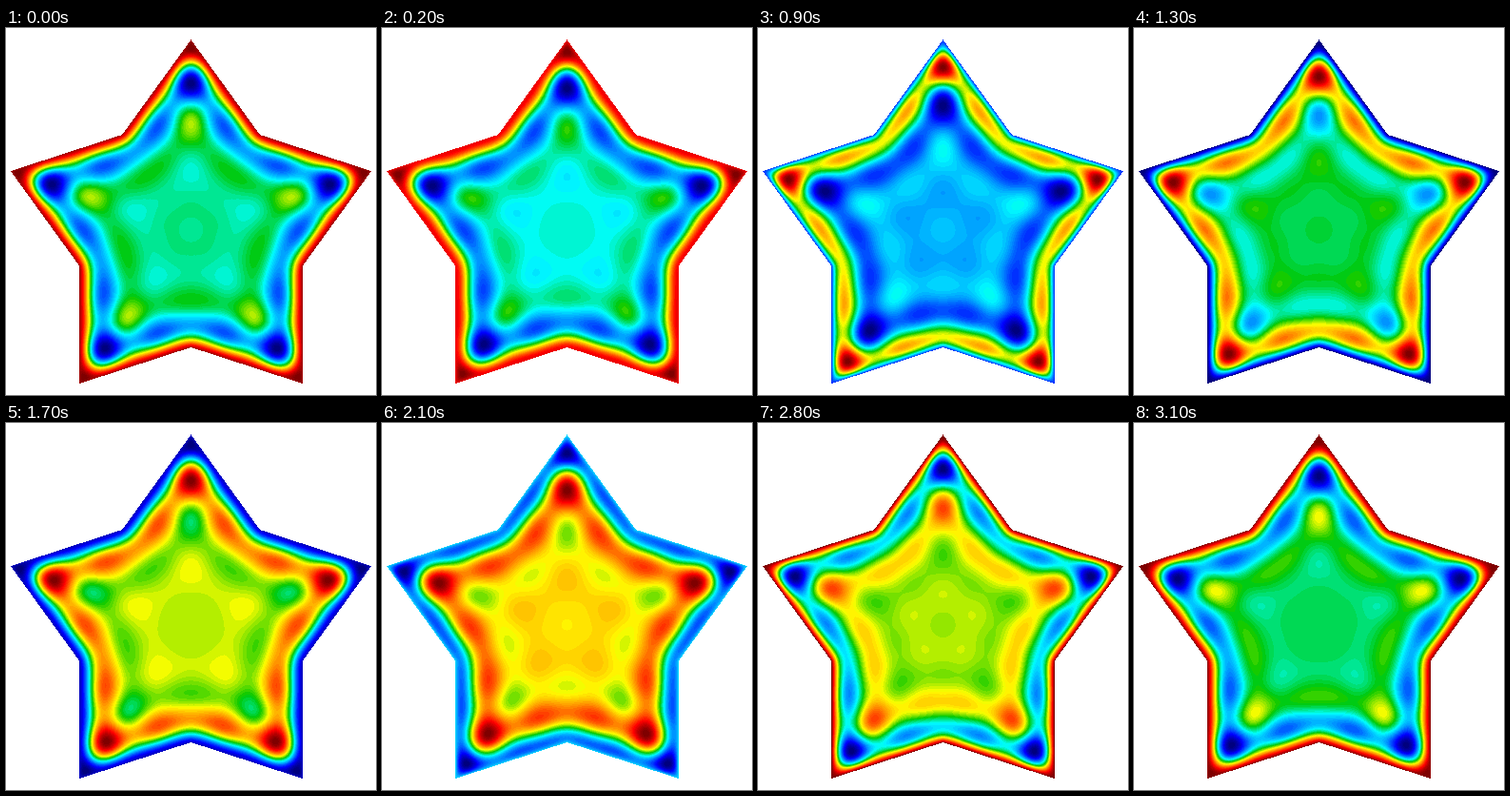
A matplotlib script that plays this animation: 389 px wide and 385 px high, repeating every 3.2 s.

```python
import numpy as np
import matplotlib.pyplot as plt
from matplotlib.animation import FuncAnimation
from matplotlib.colors import LinearSegmentedColormap

W, H, DPI = 389, 385, 64
FRAMES, INTERVAL = 32, 100
CX, CY = 194.5, 211.7
R_TIP = 199.4
R_NOTCH = R_TIP * (np.sqrt(5) - 1) / 2
K = 0.112 - 0.037j          # damped wavenumber per pixel
N = 64                      # mesh subdivisions of one tenth of the star
LEVELS = 64

TIP = np.array([R_TIP, 0.0])
NOTCH = R_NOTCH * np.array([np.cos(np.pi / 5), np.sin(np.pi / 5)])

cmap = LinearSegmentedColormap.from_list("bands", [
    (0.0, (0, 0, 0.5)), (0.125, (0, 0, 1)), (0.375, (0, 1, 1)),
    (0.5, (0, 0.78, 0)), (0.625, (1, 1, 0)), (0.875, (1, 0, 0)),
    (1.0, (0.5, 0, 0))])
palette = cmap(np.linspace(0, 1, LEVELS))[:, :3]


def node(i, j):
    return i * (i + 1) // 2 + j


def element_matrix():
    """Linear-element matrix of the Helmholtz operator on one small triangle."""
    a, b = TIP / N, NOTCH / N
    jac = np.array([a, b])
    area = abs(np.linalg.det(jac)) / 2
    g = np.linalg.inv(jac)
    grads = np.column_stack([-g.sum(axis=1), g])
    stiff = area * grads.T @ grads
    mass = area / 12 * (np.ones((3, 3)) + np.eye(3))
    return stiff - K**2 * mass


def solve_wave():
    """Complex amplitude on the mesh: 1 on the rim, mirror symmetric inside."""
    tris = []
    for i in range(N):
        for j in range(i + 1):
            tris.append((node(i, j), node(i + 1, j), node(i + 1, j + 1)))
            if j < i:
                tris.append((node(i + 1, j + 1), node(i, j + 1), node(i, j)))
    tris = np.array(tris)
    total, free = node(N, N) + 1, node(N, 0)
    mat = np.zeros((total, total), complex)
    local = element_matrix()
    for p in range(3):
        for q in range(3):
            np.add.at(mat, (tris[:, p], tris[:, q]), local[p, q])
    amp = np.ones(total, complex)
    amp[:free] = np.linalg.solve(mat[:free, :free],
                                 -mat[:free, free:].sum(axis=1))
    grid = np.zeros((N + 1, N + 1), complex)
    grid[np.tril_indices(N + 1)] = amp
    return grid


def sample(grid, s, t):
    """Interpolate the mesh at rows s and columns t (both in 0..1)."""
    s = np.clip(s * N, 0, N)
    t = np.clip(t * N, 0, s)
    i = np.minimum(s.astype(int), N - 1)
    j = np.minimum(t.astype(int), i)
    u, v = s - i, t - j
    w00, w11 = grid[i, j], grid[i + 1, j + 1]
    w10, w01 = grid[i + 1, j], grid[i, j + 1]
    upper = w00 + (u - v) * (w10 - w00) + v * (w11 - w00)
    lower = w00 + u * (w11 - w01) + v * (w01 - w00)
    return np.where(u >= v, upper, lower)


# Fold every pixel into one tenth of the star.
px, py = np.meshgrid(np.arange(W) + 0.5 - CX, CY - np.arange(H) - 0.5)
radius = np.hypot(px, py)
sector = 2 * np.pi / 5
angle = np.abs((np.arctan2(px, py) + sector / 2) % sector - sector / 2)
beta = radius * np.sin(angle) / NOTCH[1]
alpha = (radius * np.cos(angle) - beta * NOTCH[0]) / R_TIP
inside = alpha + beta <= 1
wave = sample(solve_wave(), (alpha + beta)[inside], beta[inside])


def picture(frame):
    u = (wave * np.exp(2j * np.pi * frame / FRAMES)).real
    level = (u - u.min()) / (u.max() - u.min())
    img = np.ones((H, W, 3))
    img[inside] = palette[np.minimum((level * LEVELS).astype(int), LEVELS - 1)]
    return img


fig = plt.figure(figsize=(W / DPI, H / DPI), dpi=DPI, facecolor="white")
ax = fig.add_axes([0, 0, 1, 1])
ax.axis("off")
image = ax.imshow(picture(0), interpolation="nearest", aspect="auto")


def update(frame):
    image.set_data(picture(frame))
    return [image]


anim = FuncAnimation(fig, update, frames=FRAMES, interval=INTERVAL,
                     repeat=True, repeat_delay=0)
plt.show()
```
